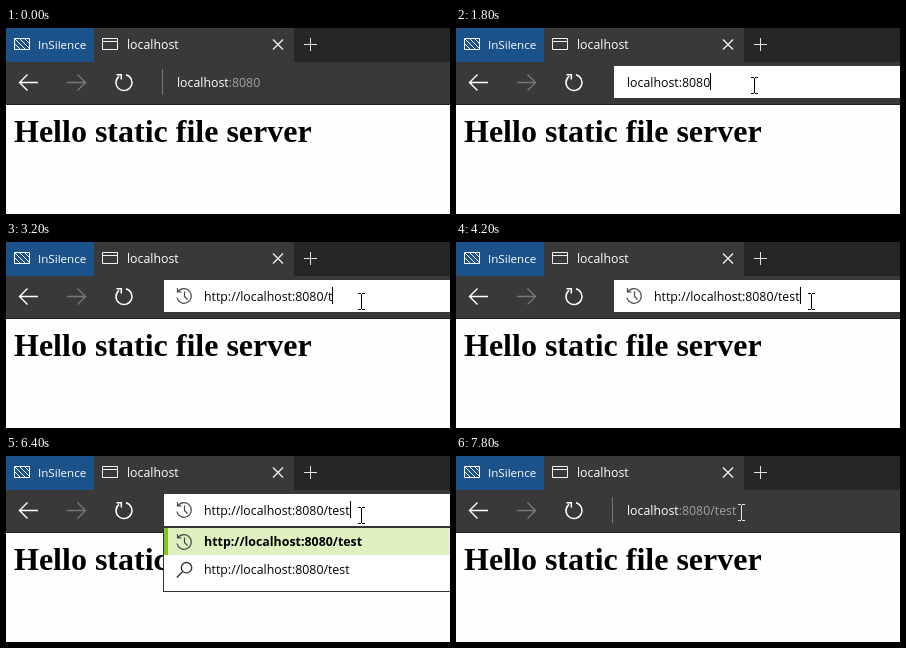
Animation, 444 px wide and 186 px high, one loop 8 s. Source, as an HTML page with a canvas:

```html
<!DOCTYPE html>
<html lang="en">
<head>
<meta charset="utf-8">
<title>Static file server</title>
<style>
html, body { margin: 0; height: 100%; overflow: hidden; background: #fefefe; }
canvas { display: block; }
</style>
</head>
<body>
<canvas width="444" height="186"></canvas>
<script>
const ctx = document.querySelector('canvas').getContext('2d');
const LOOP = 8000;
const UI = '"Open Sans", sans-serif';
const URL_FONT = '12.35px ' + UI;
const BASE_URL = 'http://localhost:8080/';
const FOCUS = 1600, SELECT = 2000, DESELECT = 2800, SUGGEST = 4400, SUBMIT = 6800;
const KEYS = [3200, 3400, 3600, 3810];
const BLINK = 530;
// Mouse path: time, x, y
const PATH = [[600, 392, 194], [1400, 298, 57], [1900, 298, 57], [2300, 355, 59],
              [7400, 355, 59], [7800, 285, 56]];

function rect(x, y, w, h, color) {
  ctx.fillStyle = color;
  ctx.fillRect(x, y, w, h);
}

// Draws text and returns the x where it ends
function text(str, x, y, color, font = URL_FONT) {
  ctx.font = font;
  ctx.fillStyle = color;
  ctx.fillText(str, x, y);
  return x + ctx.measureText(str).width;
}

function stroke(d, color, width = 1) {
  ctx.strokeStyle = color;
  ctx.lineWidth = width;
  ctx.stroke(new Path2D(d));
}

function at(x, y, draw) {
  ctx.save();
  ctx.translate(x, y);
  draw();
  ctx.restore();
}

const navArrow = (x, flip, color) => at(x, 54.5, () => {
  ctx.scale(flip, 1);
  stroke('M9.5 0H-9M-1 -8L-9 0L-1 8', color, 1.4);
});

const searchIcon = y => at(180.5, y, () =>
  stroke('M5.2 -2.3A5.2 5.2 0 1 1 -5.2 -2.3A5.2 5.2 0 1 1 5.2 -2.3M-3.7 1.5L-9.7 7.5', '#333', 1.4));

const historyIcon = y => at(178, y, () =>
  stroke('M-5.8 -4.4A7.3 7.3 0 1 1 -7.1 1.5M-6.5 -8V-4H-2.5M.5 -4.5V.5L3.5 3.5', '#444', 1.2));

function chrome() {
  rect(0, 0, 444, 186, '#fefefe');
  rect(0, 0, 444, 34, '#262626');
  rect(0, 0, 88, 34, '#1b528a');
  rect(88, 0, 200, 34, '#39393a');
  rect(0, 34, 444, 42, '#39393a');
  rect(0, 76, 444, 1, '#1c1c1c');

  stroke('M8.5 10.5H23.5V21.5H8.5ZM9 16L14 21M9 11L19 21M14 11L23 20M19 11L23 15', '#fff');
  text('InSilence', 32, 21, '#fff', '11.6px ' + UI);
  stroke('M96.5 10.5H111.5V21.5H96.5ZM96.5 13.5H111.5', '#f2f2f2');
  text('localhost', 121, 21, '#fff');
  stroke('M267 11.5L277 21.5M277 11.5L267 21.5', '#f0f0f0', 1.3);
  stroke('M298 16.5H311M304.5 10V23', '#e4e4e4');

  navArrow(22.5, 1, '#fff');
  navArrow(70.5, -1, '#777');
  at(118, 54.5, () =>
    stroke('M2 -7.7A8 8 0 1 1 -5 -6.2M-7.5 -7.8H-2.7V-3', '#fff', 1.5));

  text('Hello static file server', 8, 114, '#000', 'bold 32px "Liberation Serif", serif');
}

function caret(x, on) {
  if (on) rect(Math.round(x), 45, 1, 17, '#000');
}

function addressBar(t) {
  if (t < FOCUS || t >= SUBMIT) {
    rect(156, 41, 1, 26, '#777');
    const end = text('localhost', 171, 59, '#fff');
    text(t < FOCUS ? ':8080' : ':8080/test', end, 59, '#a0a0a0');
    return;
  }
  rect(158, 38, 286, 32, '#fff');
  if (t < SELECT) {
    caret(text('localhost:8080', 171, 59, '#000'), true);
    return;
  }
  const typed = KEYS.filter(k => t >= k).length;
  if (typed) historyIcon(54); else searchIcon(54);
  if (t < DESELECT) {
    ctx.font = URL_FONT;
    rect(198, 45, Math.ceil(ctx.measureText(BASE_URL).width), 17, '#0078d7');
    text(BASE_URL, 198, 59, '#fff');
    return;
  }
  const since = t - (typed ? KEYS[typed - 1] : DESELECT);
  const end = text(BASE_URL + 'test'.slice(0, typed), 198, 59, '#000');
  caret(end, Math.floor(since / BLINK) % 2 === 0);
  if (t >= SUGGEST) suggestions();
}

function suggestions() {
  rect(157, 70, 287, 66, '#333');
  rect(158, 72, 286, 63, '#fff');
  rect(158, 72, 286, 27, '#dff1c0');
  rect(158, 72, 4, 27, '#84c225');
  historyIcon(86);
  text(BASE_URL + 'test', 198, 90, '#000', 'bold 12.4px ' + UI);
  searchIcon(114);
  text(BASE_URL + 'test', 198, 118, '#000');
}

function mousePosition(t) {
  const next = PATH.findIndex(p => p[0] > t);
  if (next < 0) return PATH[PATH.length - 1].slice(1);
  const [t0, x0, y0] = PATH[next - 1], [t1, x1, y1] = PATH[next];
  const k = (t - t0) / (t1 - t0), e = k * k * (3 - 2 * k);
  return [x0 + (x1 - x0) * e, y0 + (y1 - y0) * e];
}

function mouse(t) {
  if (t < PATH[0][0]) return;
  const [x, y] = mousePosition(t).map(Math.round);
  at(x, y, () => {
    if (y > 70) {
      const arrow = new Path2D('M.5 .5V15L4 11.7L6.3 17L8.6 16L6.3 11H11Z');
      ctx.fillStyle = '#fff';
      ctx.fill(arrow);
      ctx.strokeStyle = '#000';
      ctx.lineWidth = 1;
      ctx.stroke(arrow);
    } else {
      const color = t >= FOCUS && t < SUBMIT ? '#000' : '#e8e8e8';
      stroke('M-3 -7.5H0M1 -7.5H4M.5 -7V8M-3 8.5H0M1 8.5H4', color);
    }
  });
}

function frame() {
  const t = performance.now() % LOOP;
  chrome();
  addressBar(t);
  mouse(t);
  requestAnimationFrame(frame);
}
frame();
</script>
</body>
</html>
```
